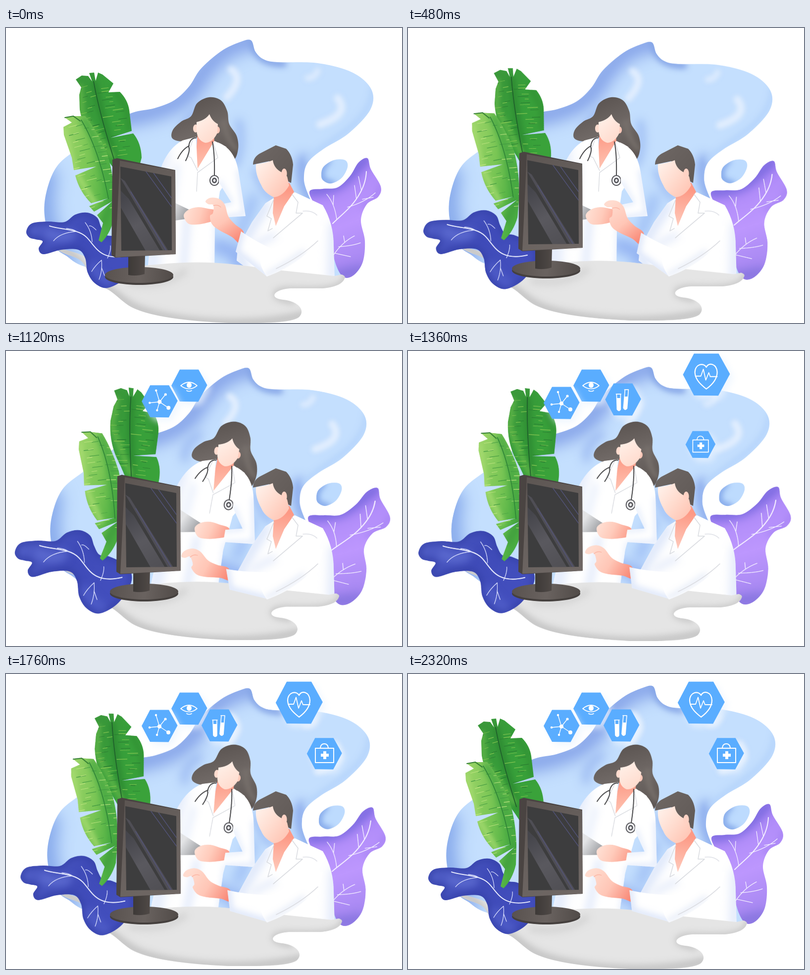
Write an HTML page with a canvas that moves like this. It is 800 px wide and 596 px high and loops after 2.4 s.

```html
<!DOCTYPE html>
<html lang="en">
<head>
<meta charset="utf-8">
<title>Clinic</title>
<style>
html, body { margin: 0; width: 100%; height: 100%; overflow: hidden; background: #fff; }
canvas { display: block; width: 800px; height: 596px; }
</style>
</head>
<body>
<canvas id="stage" width="800" height="596"></canvas>
<script>
const W = 800, H = 596, LOOP = 2400, STEP = 80, SS = 2;
const ctx = document.getElementById('stage').getContext('2d');
ctx.imageSmoothingQuality = 'high';

const P = d => new Path2D(d);

// Closed curve through the given points
function smooth(str) {
  const v = str.split(/[ ,]+/).map(Number), n = v.length / 2, path = new Path2D();
  const at = i => { const k = (i + n) % n; return [v[2 * k], v[2 * k + 1]]; };
  path.moveTo(v[0], v[1]);
  for (let i = 0; i < n; i++) {
    const [a, b, c, d] = [at(i - 1), at(i), at(i + 1), at(i + 2)];
    path.bezierCurveTo(b[0] + (c[0] - a[0]) / 6, b[1] + (c[1] - a[1]) / 6,
      c[0] - (d[0] - b[0]) / 6, c[1] - (d[1] - b[1]) / 6, c[0], c[1]);
  }
  path.closePath();
  return path;
}

function layer(draw) {
  const c = document.createElement('canvas');
  c.width = W * SS;
  c.height = H * SS;
  const g = c.getContext('2d');
  g.scale(SS, SS);
  g.lineCap = g.lineJoin = 'round';
  draw(g);
  return c;
}

function lin(g, x0, y0, x1, y1, ...cols) {
  const gr = g.createLinearGradient(x0, y0, x1, y1);
  cols.forEach((c, i) => gr.addColorStop(i / (cols.length - 1), c));
  return gr;
}

// Filled shape with soft strokes [path, colour, width, blur] kept inside it
function shape(g, path, fill, ...soft) {
  g.save();
  g.fillStyle = fill;
  g.fill(path);
  g.clip(path);
  for (const [d, color, width, blur] of soft) {
    g.filter = `blur(${blur * SS}px)`;
    g.strokeStyle = color;
    g.lineWidth = width;
    g.stroke(typeof d === 'string' ? P(d) : d);
  }
  g.restore();
}

function line(g, d, color, width) {
  g.strokeStyle = color;
  g.lineWidth = width;
  g.stroke(P(d));
}

function disc(g, x, y, rx, ry, fill) {
  g.fillStyle = fill;
  g.beginPath();
  g.ellipse(x, y, rx, ry, 0, 0, 7);
  g.fill();
}

function seeded(s) {
  return () => (s = (s * 16807) % 2147483647) / 2147483647;
}

// Short fibres on both sides of a leaf's midrib
function fibres(g, path, [x0, y0, x1, y1], reach, count, color, seed) {
  const rnd = seeded(seed);
  g.save();
  g.clip(path);
  for (let i = 0; i < count; i++) {
    const u = (i + rnd()) / count, side = i % 2 ? 1 : -1;
    const a = reach * rnd() * 0.75, len = 7 + rnd() * 14;
    const x = x0 + (x1 - x0) * u + side * a, y = y0 + (y1 - y0) * u - a * 0.12 * side;
    line(g, `M${x} ${y}l${side * len} ${-side * len * 0.2 + 1}`, color, 0.6 + rnd() * 0.7);
  }
  g.restore();
}

const blob = layer(g => {
  const body = smooth('495 25 504 48 520 63 548 69 630 71 700 90 738 124 736 165 692 213 642 244 611 270 602 298 608 330 640 400 668 465 685 486 680 500 640 505 500 505 200 490 118 458 92 430 78 380 82 330 104 278 150 240 210 195 256 171 300 162 340 146 370 118 394 82 436 46 474 28');
  shape(g, body, '#c4dffe',
    ['M500 25C440 28 408 70 382 112S300 170 235 180', '#84a2e8', 40, 16],
    ['M495 20C502 60 525 72 560 72', '#84a4e6', 14, 6],
    ['M80 300C68 360 76 430 120 470', '#83a6ea', 44, 17],
    ['M600 265C592 310 612 340 640 390', '#7fa0e8', 20, 11],
    ['M742 120C740 190 660 220 612 264', '#b4d3fb', 10, 6],
    ['M470 190Q480 240 462 275M505 290Q520 330 540 345', '#9dbcf3', 14, 9],
    ['M360 215Q360 180 390 165', '#9bb9f1', 16, 10],
    ['M425 440L480 460L470 480', '#8eaef0', 28, 13],
    ['M500 345L470 420', '#9bbcf4', 20, 12],
    ['M455 84Q482 102 446 140', '#e2eefe', 14, 5],
    ['M609 101Q622 103 630 86', '#dcebfe', 12, 5],
    ['M670 142Q696 174 634 195', '#e2eefe', 15, 5]);
  shape(g, smooth('637 299 641 281 662 267 685 267 690 281 678 303 657 314 642 309'), '#bddbfe',
    ['M650 268Q630 285 640 310L660 316', '#7fa4e8', 13, 6]);
});

const deskPath = P('M100 444C130 450 150 455 175 470C230 490 285 478 340 475C430 469 490 482 540 488L663 501L678 498Q687 501 684 506C680 518 662 524 640 526L575 526C540 528 530 546 560 549C590 552 606 570 592 584C575 598 500 596 450 596C360 592 285 582 250 562C228 548 215 530 196 524C170 515 168 490 155 474C145 460 115 460 100 444Z');
const desk = layer(g => shape(g, deskPath, '#e5e5e5',
  ['M100 446C160 450 150 515 205 526C245 555 250 570 330 585S520 602 600 580', '#c2c2c2', 16, 7],
  ['M688 500C680 530 640 530 570 528C535 530 535 548 580 553', '#c4c4c4', 10, 6],
  ['M250 515Q320 525 360 492', '#d3d3d3', 12, 7]));

const blueLeaf = layer(g => {
  const leaf = smooth('41 411 52 395 84 391 118 392 140 377 164 373 184 383 192 402 202 418 222 422 256 440 264 468 240 506 205 525 180 516 165 494 160 465 146 448 112 448 76 457 66 446 74 431 60 427 47 423');
  shape(g, leaf, lin(g, 41, 380, 220, 510, '#5563ca', '#3f4bb8', '#434fbe'),
    [leaf, '#3541a8', 9, 6],
    ['M85 415Q115 428 135 418', '#6170d4', 14, 8],
    ['M175 480Q190 505 210 515', '#5260ca', 14, 8]);
  line(g, 'M88 400C112 408 145 405 163 423S190 472 246 460', '#eef1ff', 1.9);
  line(g, 'M122 405Q136 406 144 412M160 393Q173 410 174 432M96 430Q110 413 143 411M182 408Q172 398 168 400M193 469Q180 480 173 492M193 470Q195 490 188 508M193 484L199 500M205 465Q212 450 211 440', '#dfe4ff', 1.2);
});

const purpleLeaf = layer(g => {
  const leaf = smooth('730 263 737 285 757 320 752 341 729 356 717 388 725 430 721 472 704 498 684 504 668 482 650 420 630 370 613 331 640 325 670 322 695 299 712 272');
  shape(g, leaf, lin(g, 640, 300, 720, 500, '#ab88f7', '#bd97fe', '#a184ee'),
    ['M612 328C680 325 690 300 728 262', '#7466dc', 20, 10],
    ['M757 318Q750 350 722 360', '#a482f2', 8, 6],
    ['M720 490L670 500', '#7e70da', 18, 11]);
  line(g, 'M660 395C680 375 700 362 716 332Q727 312 728 290', '#f4efff', 2);
  line(g, 'M648 336Q664 355 668 386M662 338L661 357M690 362Q725 352 746 333M708 346L704 318M718 328L712 300M720 346L742 342M662 458Q680 432 704 420M684 432L682 420M672 442Q700 440 716 434M664 455L696 462', '#f4efff', 1.3);
});

const darkLeaf = layer(g => {
  const leaf = P('M141 104L153 96L166 97L174 108L168 91L178 90L181 107L186 90L195 94L217 112L207 130L230 129Q246 145 249 166L254 208L211 222L257 213Q273 232 274 262L264 300L228 300Q206 265 180 235Q156 205 149 165L148 135L152 120Z');
  shape(g, leaf, lin(g, 145, 170, 260, 190, '#3a983a', '#38a03b', '#3aa23a'),
    ['M178 112Q192 175 222 270', '#2c8831', 12, 6],
    ['M150 120L154 175L215 260', '#5fb548', 10, 5],
    ['M215 120L245 165L250 205', '#319034', 10, 6]);
  fibres(g, leaf, [178, 115, 216, 260], 40, 30, '#8ecb53', 11);
  fibres(g, leaf, [178, 120, 216, 250], 40, 18, '#27762f', 37);
  line(g, 'M177 108Q188 170 219 268', '#1f602b', 1.8);
});

const lightLeaf = layer(g => {
  const leaf = P('M119 181L136 178L160 178Q184 208 203 250Q217 290 219 345L218 385Q211 415 193 433L187 429L196 394L184 378L215 350L178 371L168 360L207 344L172 354Q148 330 140 298L182 280L137 287L133 262L117 216L116 200L133 191Z');
  shape(g, leaf, lin(g, 118, 260, 218, 270, '#98d366', '#7ac655', '#4aae42'),
    ['M158 185Q190 235 212 345', '#45a642', 14, 7],
    ['M118 205L140 290L180 355', '#a8dc72', 8, 5],
    ['M196 395L214 350', '#429f3e', 14, 6]);
  fibres(g, leaf, [155, 195, 205, 340], 38, 24, '#3f9740', 23);
  fibres(g, leaf, [153, 195, 205, 370], 40, 26, '#c2e682', 71);
  line(g, 'M152 186Q188 245 207 345', '#2f8437', 1.7);
  line(g, 'M119 181L136 178L150 188', '#347f34', 2);
});

const SKIN = '#ffdccf', BLUSH = '#fca391', HAIR = '#625b58', FOLD = '#d9dbe0';

const womanBody = layer(g => {
  const hair = smooth('410 140 434 146 447 168 451 194 466 218 469 244 460 266 438 255 420 230 385 221 357 229 336 223 337 206 354 189 374 178 386 152');
  shape(g, hair, lin(g, 390, 140, 440, 260, '#5b5451', '#706966', '#5f5855'),
    ['M440 190Q445 225 465 245', '#7b746f', 8, 5]);
  shape(g, P('M387 212L385 240L386 285L420 244L421 212Z'), lin(g, 390, 225, 400, 280, '#fda08c', '#ffc3b2'));
  disc(g, 383, 203, 5, 8, SKIN);
  disc(g, 427, 206, 5, 7, '#ffc9b9');
  shape(g, P('M385 190Q403 186 411 174Q416 188 428 194L427 212Q418 231 403 232Q387 228 385 208Z'),
    lin(g, 385, 185, 425, 230, '#fff0e8', '#ffd9cb'));
  const coat = P('M357 227L384 220L387 284L421 228L445 240L452 300L432 330L422 400L421 500L285 500L300 340C306 290 322 245 357 227Z');
  shape(g, coat, '#fff',
    ['M318 250C300 310 300 420 295 500', '#dbe5fa', 22, 12],
    ['M366 385L358 490', '#e2eafb', 14, 8],
    ['M425 385L424 480', '#e1eafb', 8, 6],
    ['M345 280L335 350', '#e8effc', 12, 8]);
  line(g, 'M378 224L366 258L374 262L387 288M419 233L428 262L420 268L387 292L385 330', FOLD, 1.4);
  line(g, 'M384 222Q371 222 369 240Q373 248 363 268M370 238Q356 245 347 264M417 230Q422 255 421 298', '#48484a', 2);
  disc(g, 421, 308, 10, 11, '#55555a');
  disc(g, 421, 308, 8, 9, '#f4f5f7');
  disc(g, 421, 308, 5, 5.5, '#4d4d52');
  disc(g, 421, 308, 2.6, 3, '#e8e8ea');
});

const womanHand = layer(g => {
  shape(g, P('M322 344L370 367L362 386L322 392Z'), lin(g, 335, 360, 372, 380, '#e3e4e6', '#94969a'));
  shape(g, smooth('359 379 369 367 388 362 408 365 428 370 426 386 408 393 386 397 368 395'),
    lin(g, 362, 370, 422, 388, '#ffe0d4', '#ffcbbb', BLUSH));
});

const womanArm = layer(g => shape(g,
  P('M428 231C456 242 466 266 470 292L484 380L420 384L421 359L455 352L430 312Z'), '#fff',
  ['M470 290L482 376L425 386', '#dde7fb', 8, 6],
  ['M432 312L454 352L422 360', '#e1eafb', 8, 6]));

const manBody = layer(g => {
  const coat = P('M540 344L524 354L497 392L468 445L466 470L520 510L664 510L662 440Q662 395 640 358L584 332Z');
  shape(g, coat, '#fff',
    ['M525 355L470 445L480 490', '#d5e1f9', 18, 10],
    ['M664 400L660 505', '#dce5f9', 18, 10],
    ['M540 420L500 440', '#e7edfb', 14, 8]);
  shape(g, P('M541 340L572 312L582 331L562 360L545 400L539 374Z'), lin(g, 560, 325, 548, 395, '#fd9985', '#ffc8b9'));
  const hair = P('M499 276Q499 262 512 254L545 237L566 244Q578 256 580 276L576 313L558 304L540 285L532 269Z');
  shape(g, hair, lin(g, 510, 245, 575, 300, '#6d6663', HAIR));
  shape(g, P('M505 275Q528 272 539 267Q541 283 556 291L568 300L572 318Q560 340 541 342Q522 333 516 318Q503 295 505 275Z'),
    lin(g, 505, 280, 570, 330, '#fff0e9', SKIN, '#ffc5b4'));
  disc(g, 562, 294, 5.5, 10, '#ffd2c4');
  line(g, 'M541 346L527 380L536 385L529 410L538 405M578 336L590 352L586 374L599 374L540 424', FOLD, 1.5);
  line(g, 'M600 370Q618 368 628 378', '#e0e2e8', 1.6);
});

const manSleeve = layer(g => {
  shape(g, P('M640 400L634 428Q590 480 527 502Q504 470 520 450Q570 440 600 400Z'), '#fff',
    ['M600 452Q560 480 527 498', '#e6ecf8', 9, 6]);
  line(g, 'M630 430Q596 462 546 486', '#dcdde2', 1.6);
});

const manArm = layer(g => {
  shape(g, smooth('403 350 413 343 430 345 442 357 449 380 462 396 480 412 474 436 456 422 430 408 416 396 412 380 418 374 419 358 409 356'),
    lin(g, 415, 350, 472, 428, '#ffdccf', '#ffc6b6', '#f98876'));
  line(g, 'M419 359Q428 356 434 362', '#fbb09f', 1.2);
  shape(g, P('M475 411Q505 432 545 450L560 482L527 502L464 452Z'), '#fff',
    ['M475 411L464 452L527 502', '#d7e2f9', 12, 7]);
});

const monitor = layer(g => {
  disc(g, 279, 490, 69, 16, '#45403e');
  disc(g, 279, 486, 69, 16, lin(g, 210, 480, 348, 490, '#59524f', '#6a6360', '#514b48'));
  shape(g, P('M257 446L291 445L290 484Q274 489 257 486Z'), lin(g, 257, 450, 291, 450, '#3e3a38', '#504a47'));
  shape(g, P('M225 253L234 250L352 274L353 444L231 451L223 446Z'), '#4a4442');
  shape(g, P('M240 255L352 275L353 444L231 450Z'), lin(g, 235, 260, 350, 440, '#5d5653', '#68615e', '#706865'));
  const screen = P('M241 267L344 287L345 436L243 437Z');
  shape(g, screen, '#3d3d3e');
  g.save();
  g.clip(screen);
  g.fillStyle = lin(g, 245, 330, 310, 436, '#46464c', '#5a595f', '#515055');
  g.fill(P('M241 315L258 332L321 437L292 437L241 348Z'));
  g.fillStyle = '#4f4e55';
  g.fill(P('M241 290L250 296L338 437L327 437Z'));
  line(g, 'M292 276L346 350M308 280L346 333M262 318L334 437', '#53547a', 1.4);
  g.restore();
});

const glyphs = {
  molecule(g) {
    for (const [x, y, r] of [[-20, 3, 2.2], [-5, 18, 2.2], [18, 13, 4], [12, -14, 2.6], [-7, -22, 2.2]]) {
      line(g, `M0 1L${x} ${y}`, '#fff', 1.4);
      disc(g, x, y, r, r, '#fff');
    }
    disc(g, 0, 1, 4, 4, '#fff');
  },
  eye(g) {
    line(g, 'M-17 0Q0 -14 16 0Q0 13 -17 0ZM-5 10Q0 13 5 10', '#fff', 1.7);
    disc(g, 0, -1, 5, 5.5, '#fff');
  },
  tubes(g) {
    line(g, 'M-14 -11H-4M-13 -11L-12 20Q-8 25 -5 20L-5 -11M3 -20H11M4 -20L1 17Q4 23 8 18L11 -20', '#fff', 1.6);
    g.fillStyle = '#fff';
    g.fill(P('M-13 -3H-5V20Q-8 25 -12 20ZM3 -6H10L8 18Q4 23 1 17Z'));
  },
  heart(g) {
    line(g, 'M0 -15C-5 -25 -23 -22 -23 -4C-22 11 -10 21 0 29C11 21 22 9 22 -5C21 -22 5 -26 0 -15Z', '#fff', 2.2);
    line(g, 'M-22 3H-11L-6 -11L-1 11L5 -4L8 4H22', '#fff', 1.8);
  },
  kit(g) {
    g.strokeStyle = '#fff';
    g.lineWidth = 1.9;
    g.strokeRect(-18, -11, 37, 29);
    line(g, 'M-8 -12Q-7 -20 0 -20T8 -12', '#fff', 1.9);
    g.fillStyle = '#fff';
    g.fill(P('M-2 -5H4V0H9V6H4V11H-2V6H-7V0H-2Z'));
  }
};

// glyph, x, y, size, start, duration
const icons = [
  ['eye', 370, 70, 1, 800, 280],
  ['molecule', 310, 105, 1, 860, 300],
  ['tubes', 431, 104, 1, 1120, 300],
  ['heart', 592, 58, 1.31, 1160, 320],
  ['kit', 643, 161, 0.98, 1260, 300]
];

const ramp = (t, a, b) => Math.max(0, Math.min(1, (t - a) / (b - a)));
const ease = u => u * u * (3 - 2 * u);
const backOut = u => 1 + 2 * (u - 1) ** 3 + (u - 1) ** 2;

function drawIcon([name, x, y, size, start, span], t) {
  if (t <= start) return;
  const k = backOut(ramp(t, start, start + span)), s = Math.min(k, 1);
  ctx.save();
  ctx.translate(290 + (x - 290) * k, 350 + (y - 350) * k);
  ctx.scale(s, s);
  ctx.save();
  ctx.scale(size, size);
  ctx.shadowColor = 'rgba(235,244,255,.75)';
  ctx.shadowBlur = 14;
  ctx.shadowOffsetX = ctx.shadowOffsetY = 7;
  ctx.fillStyle = '#5aadff';
  ctx.fill(P('M-36 0L-19 -32.5L19 -32.5L36.5 -1L18.5 32.5L-19 32Z'));
  ctx.restore();
  ctx.lineCap = ctx.lineJoin = 'round';
  glyphs[name](ctx);
  ctx.restore();
}

function put(img, ...m) {
  ctx.save();
  if (m.length) ctx.transform(...m);
  ctx.drawImage(img, 0, 0, W, H);
  ctx.restore();
}

function scaled(s, x, y) {
  return [s, 0, 0, s, x * (1 - s), y * (1 - s)];
}

function turned(a, x, y) {
  const c = Math.cos(a), s = Math.sin(a);
  return [c, s, -s, c, x - c * x + s * y, y - s * x - c * y];
}

function render(t) {
  const p = Math.min(t, 2320 - t) / 1160;
  const q = p / 0.966;
  const breathe = scaled(1 - 0.0405 * p, 385, 285);
  ctx.fillStyle = '#fff';
  ctx.fillRect(0, 0, W, H);

  put(blob, ...breathe);
  put(purpleLeaf, 1 + 0.14 * q, 0.07 * q, -0.1 * q, 1 - 0.01 * q, -55.3 * q, -34.7 * q);
  put(darkLeaf, ...turned(0.259 * p, 276, 400));

  icons.forEach(icon => drawIcon(icon, t));

  const lean = turned(0.13 * ease(ramp(t, 840, 1100)), 415, 530);
  const lift = -15 * ramp(t, 520, 760);
  put(womanBody, ...lean);
  ctx.save();
  ctx.transform(...lean);
  put(womanHand, 1, 0, 0, 1, 0, lift);
  put(womanArm);
  ctx.restore();

  put(manBody);
  put(desk, ...breathe);
  put(blueLeaf, 1 + 0.06 * q, -0.014 * q, -0.016 * q, 1 + 0.109 * q, -19 * q, -49.3 * q);
  put(lightLeaf, ...turned(0.13 * p, 270, 445));

  const reach = 0.43 * ramp(t, 440, 800) - 0.045 * ramp(t, 1120, 1360);
  put(manArm, ...turned(-reach, 527, 495));
  put(manSleeve);

  const out = 1 - ramp(t, 0, 320);
  put(monitor, 1, 0, 0, 1, -10 * out, 13 * out);
}

function tick(now) {
  render(Math.floor((now % LOOP) / STEP) * STEP);
  requestAnimationFrame(tick);
}
render(0);
requestAnimationFrame(tick);
</script>
</body>
</html>
```
